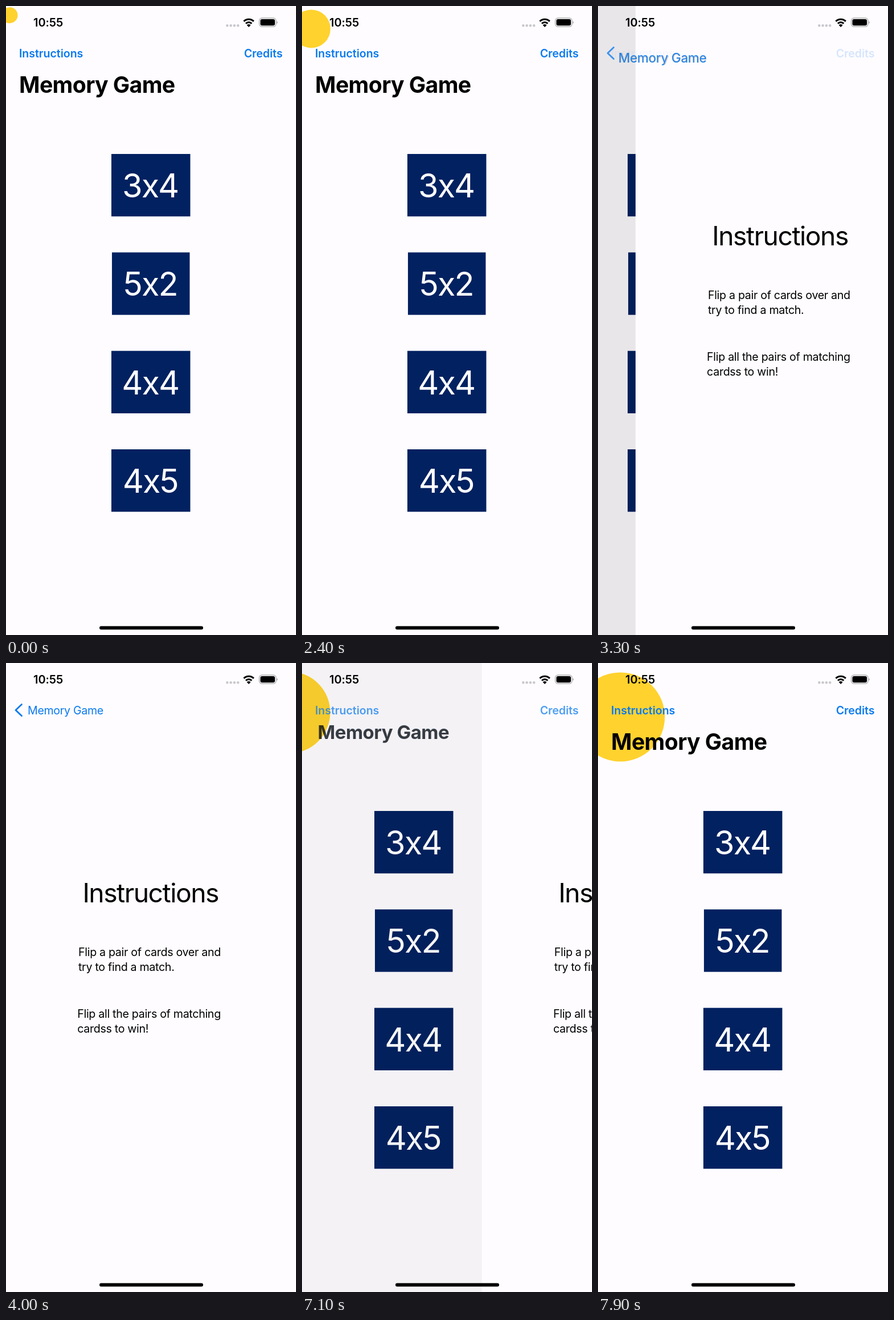
Animation of 509 by 1101 pixels, one loop 8 s. Source, as an HTML page:

```html
<!DOCTYPE html>
<html lang="en">
<head>
<meta charset="utf-8">
<title>Memory Game</title>
<style>
  html, body { margin: 0; width: 100%; height: 100%; overflow: hidden; background: #fefcff; }
  svg { display: block; width: 509px; height: 1101px; }
  text { font-family: Inter, "Open Sans", sans-serif; font-size: 19.6px; font-optical-sizing: none; white-space: pre; }
  .link { fill: #0a7aee; }
  .semi { font-weight: 600; letter-spacing: -.06px; }
  .size { font-size: 57.5px; letter-spacing: -1.9px; text-anchor: middle; fill: #fff; }
  .head { font-size: 46.2px; letter-spacing: -1.45px; }
  .body { letter-spacing: -.3px; }
  #back { letter-spacing: -.32px; }
  #title { font-size: 39.2px; font-weight: 700; letter-spacing: -.62px; }
</style>
</head>
<body>
<svg viewBox="0 0 509 1101">
  <rect width="509" height="1101" fill="#fefcff"/>

  <g id="home">
    <circle id="sun" fill="#ffd22e"/>
    <g id="buttons"></g>
  </g>
  <rect id="dim" width="509" height="1101"/>

  <g id="page">
    <rect width="509" height="1101" fill="#fefcff"/>
    <text class="head" x="134.4" y="419.2">Instructions</text>
    <text class="body" x="127" y="513">Flip a pair of cards over and</text>
    <text class="body" x="127" y="539">try to find a match.</text>
    <text class="body" x="125.2" y="620.5">Flip all the pairs of matching</text>
    <text class="body" x="125.2" y="646.5">cardss to win!</text>
  </g>

  <!-- navigation bar -->
  <text id="help" class="link semi" x="23" y="89.7">Instructions</text>
  <text id="credits" class="link semi" x="485.5" y="89.7" text-anchor="end">Credits</text>
  <text id="title">Memory Game</text>
  <text id="back" class="link">Memory Game</text>
  <path id="chevron" d="M27.5 72.5 17 82.5 27.5 92.5" fill="none" stroke="#0a7aee" stroke-width="2.8" stroke-linecap="round" stroke-linejoin="round"/>

  <!-- status bar and home indicator -->
  <text class="semi" x="48" y="36.2" style="font-size:20px">10:55</text>
  <path d="M388.3 34.3h19.1" stroke="#c9c8cc" stroke-width="4.6" stroke-linecap="round" stroke-dasharray="0 6.3"/>
  <g fill="none" stroke="#000" stroke-width="3">
    <path d="M417.4 26.9a12.3 12.3 0 0 1 17.4 0"/>
    <path d="M420.9 30.7a7.4 7.4 0 0 1 10.4 0"/>
  </g>
  <path d="M426.1 37 422.7 33.4a4.8 4.8 0 0 1 6.8 0z"/>
  <rect x="444.5" y="21.2" width="29.4" height="15" rx="4.6" fill="none" stroke="#a3a2a6" stroke-width="1.2"/>
  <rect x="446.4" y="23.1" width="25.6" height="11.2" rx="3"/>
  <path d="M475.3 26.4q1.6.7 1.6 2.3t-1.6 2.3z" fill="#a3a2a6"/>
  <rect x="164" y="1085.5" width="182" height="6" rx="3"/>
</svg>
<script>
const $ = id => document.getElementById(id);
const set = (id, attrs) => {
  for (const key in attrs) $(id).setAttribute(key, attrs[key]);
};
const mix = (a, b, k) => a + (b - a) * k;

$("buttons").innerHTML = ["3x4", "5x2", "4x4", "4x5"].map((label, i) => {
  const y = 259 + 172.33 * i, w = i === 1 ? 136.5 : 138.5;
  return `<rect x="${254.2 - w / 2}" y="${y}" width="${w}" height="109.3" fill="#022160"/>
    <text class="size" x="253.2" y="${y + 76}">${label}</text>`;
}).join("");

// critically damped spring from 0 to 1
const spring = (ms, rate) => {
  const x = Math.max(0, ms / 1000 * rate);
  return 1 - Math.exp(-x) * (1 + x);
};

// screen updates every 100 ms, with a few stalls
function tick(now) {
  const t = Math.floor(now % 8000 / 100) * 100;
  if (t > 2600 && t < 3000) return 2600;
  if (t === 3400 || t === 3600) return t - 100;
  return t;
}

// 0 = menu, 1 = instructions page
function progress(t) {
  if (t < 3000) return 0;
  if (t < 4000) return spring(t - 2987, 11.38);
  if (t < 7000) return 1;
  return t < 7900 ? 1 - spring(t - 6960, 15) : 0;
}

function draw(t) {
  const s = t / 1000, p = progress(t);
  const q = p ** 1.22, fade = 1 - p ** 1.3;
  const helpDim = t >= 3000 && t < 4000 ? .22 : 1;
  const backDim = t >= 6700 ? .2 : 1;

  set("sun", { cx: 6.5 + 4.15 * s, cy: 16.2 + 9.9 * s, r: 14 + 8.1 * s });
  set("home", { transform: `translate(${-152.7 * p})` });
  set("dim", { opacity: .1 * p });
  set("page", { transform: `translate(${509 * (1 - p)})` });

  set("help", { opacity: helpDim * fade });
  set("credits", { opacity: fade });

  // the large title shrinks into the back label
  const place = `translate(${mix(23, 38, q)} ${mix(151.5, 89.7, q)})`;
  const scale = mix(1, .487, q);
  set("title", { transform: `${place} scale(${scale})`, opacity: 1 - p ** 1.5 });
  set("back", { transform: `${place} scale(${scale / .487})`, opacity: p * backDim });
  set("chevron", { opacity: Math.max(0, (p - .4) / .6) * backDim });
}

function loop() {
  draw(tick(performance.now()));
  requestAnimationFrame(loop);
}
loop();
</script>
</body>
</html>
```
